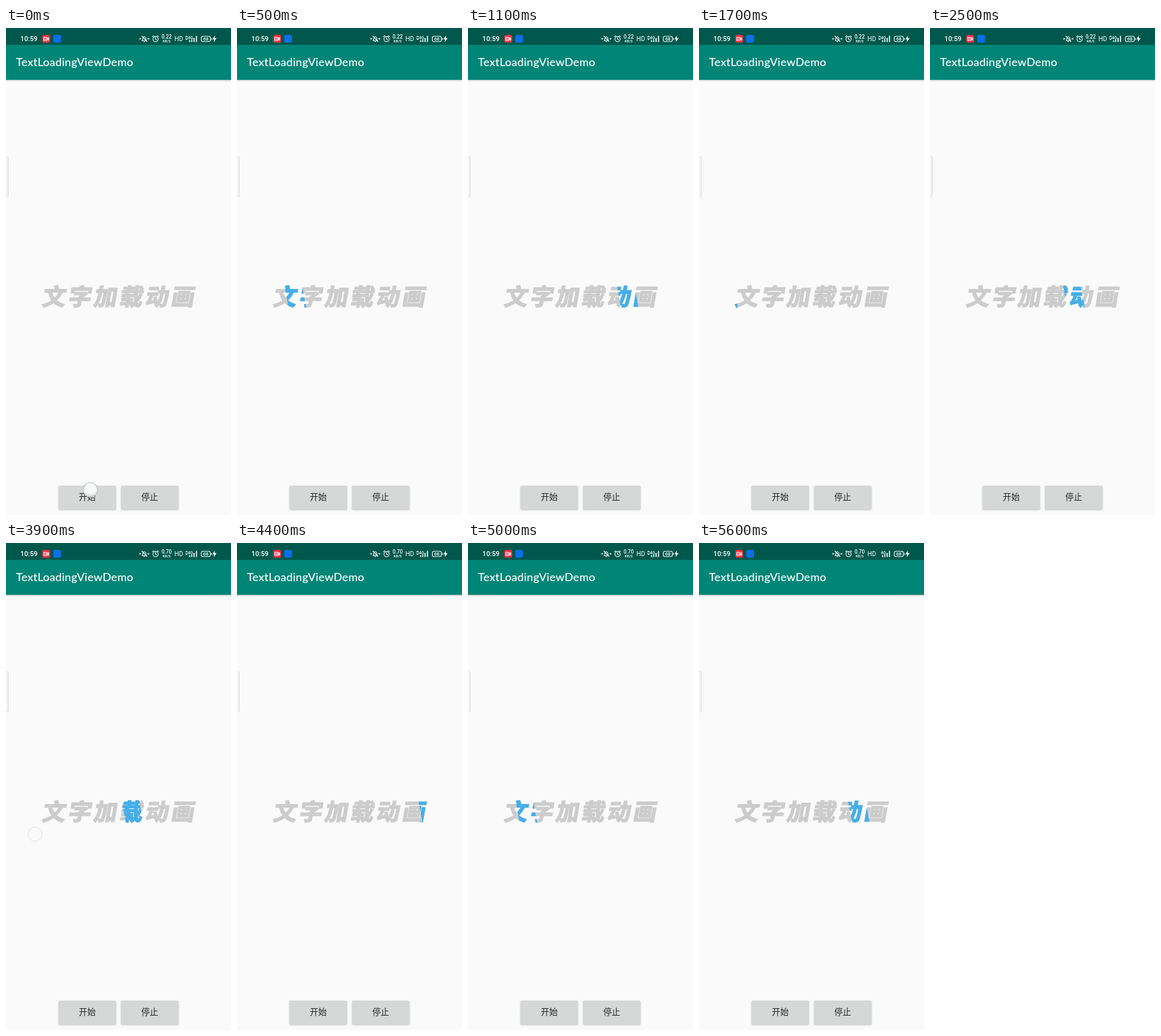
These frames come from a looping animation (360 by 780 pixels, 5700 ms). An HTML page:

```html
<!DOCTYPE html>
<html lang="zh-CN">
<head>
<meta charset="utf-8">
<title>TextLoadingViewDemo</title>
<style>
  html, body { margin: 0; width: 100%; height: 100%; overflow: hidden; background: #fafafa; }
  svg { display: block; width: 360px; height: 780px; }
  text { font-family: Lato, "Noto Sans CJK SC", "Noto Sans CJK", sans-serif; }
  .word { font: 900 37px "Noto Sans CJK SC", "Noto Sans CJK", sans-serif; letter-spacing: 4.2px; }
  .gray { fill: #ccc; stroke: #ccc; }
  .blue { fill: #46aeea; stroke: #46aeea; }
  .gray, .blue { stroke-width: 1.7px; stroke-linejoin: miter; stroke-miterlimit: 2; }
  .title { font-size: 18px; letter-spacing: .3px; fill: #fff; stroke: #fff; stroke-width: .2px; }
  .status { fill: #fff; font-family: Roboto, sans-serif; font-weight: 500; }
  .line { fill: none; stroke: #fff; stroke-width: 1.1; stroke-linecap: round; stroke-linejoin: round; }
  .label { font: 400 13.5px "Noto Sans CJK SC", "Noto Sans CJK", sans-serif; fill: #222; text-anchor: middle; }
  .button { fill: #d6d7d7; filter: drop-shadow(0 1px 1px rgba(0, 0, 0, .24)); }
</style>
</head>
<body>
<svg viewBox="0 0 360 780">
  <defs>
    <text id="word" class="word" transform="translate(57 444) skewX(-10)">文字加载动画</text>
    <clipPath id="clip"><polygon id="band"/></clipPath>
    <linearGradient id="shade" x2="0" y2="1">
      <stop stop-color="#000" stop-opacity=".2"/>
      <stop offset="1" stop-color="#000" stop-opacity="0"/>
    </linearGradient>
  </defs>

  <rect width="360" height="780" fill="#fafafa"/>
  <rect y="83" width="360" height="3" fill="url(#shade)"/>
  <rect y="27" width="360" height="56" fill="#008577"/>
  <rect width="360" height="27" fill="#00574b"/>
  <text class="title" x="16" y="61">TextLoadingViewDemo</text>

  <!-- status bar -->
  <text class="status" x="23" y="21" font-size="10.8">10:59</text>
  <rect x="58" y="11" width="12.5" height="12.5" rx="3" fill="#ee3044"/>
  <path class="line" d="M60.5 15h5v5h-5zM66 17l2.2-1.5v4L66 18M63 16.5v2"/>
  <rect x="75.5" y="11" width="12.5" height="12.5" rx="3" fill="#0b6fe8"/>
  <path class="line" d="M217.5 20.3h7.5M218.5 20l.5-4q2.3-4.5 4.6 0l.5 4M220.5 21.8h1.5M217.5 13l8 8.5M214 16.3v2M215.7 16.8v1M228.5 16.3v2M226.8 16.8v1"/>
  <circle class="line" cx="239.3" cy="17.8" r="4.2"/>
  <path class="line" d="M239.3 15.5v2.500l1.600 1M234.500 14l2-1.700M244.100 14l-2-1.700"/>
  <text class="status" id="speed" x="257" y="17" font-size="8.2" font-weight="700" text-anchor="middle">0.22</text>
  <text class="status" x="257" y="23" font-size="5.5" font-weight="700" text-anchor="middle">KB/S</text>
  <text class="status" x="269.5" y="21.3" font-size="10" style="font-weight:400">HD</text>
  <path class="line" id="arrows" d="M287.5 14.500l1.400-1.500 1.400 1.500M287.500 17l1.400 1.500 1.400-1.500"/>
  <text class="status" x="291" y="17.5" font-size="6.5">4G</text>
  <path stroke="#fff" stroke-width="1.7" d="M293.8 22.500v-3M297.300 22.500v-4M300.900 22.500v-6.500M304.700 22.500v-10"/>
  <rect class="line" x="312.5" y="13.2" width="14.5" height="8.6" rx="2.5"/>
  <path class="line" d="M328.5 16.5v2"/>
  <text class="status" x="319.8" y="20.2" font-size="7.5" text-anchor="middle">68</text>
  <path fill="#fff" d="M334.5 12l-4.500 6.200h3l-.8 4.500 4.800-6.400h-3.200z"/>

  <rect x="-2" y="206" width="5.5" height="64.5" rx="1.8" fill="#f4f4f4" stroke="#d9d9d9"/>

  <use href="#word" class="gray"/>
  <g clip-path="url(#clip)"><use href="#word" class="blue"/></g>

  <rect class="button" x="84" y="733" width="92" height="38" rx="2"/>
  <rect class="button" x="184" y="733" width="92" height="38" rx="2"/>
  <text class="label" x="130" y="756">开始</text>
  <text class="label" x="230" y="756">停止</text>

  <g id="press">
    <circle cx="135" cy="739.5" r="11.3" fill="#fafafa" fill-opacity=".8" stroke="#bcc6c4" stroke-width="1.3"/>
    <circle cx="135" cy="739.5" r="8.5" fill="#fff" fill-opacity=".5"/>
  </g>
  <circle id="tap" cx="46.5" cy="466.5" r="11.3" fill="#fafafa" fill-opacity=".6" stroke="#e2e2e2"/>
</svg>
<script>
  const LOOP = 5700, STEP = 100, SWEEP = 1500, DELAY = 63;
  const LEFT = 57, TRAVEL = 276, WIDTH = 28, LEAN = 7, TOP = 412, BOTTOM = 449;
  const $ = id => document.getElementById(id);
  const show = (id, on) => $(id).setAttribute('visibility', on ? 'visible' : 'hidden');

  function draw(t) {
    const phase = Math.max(0, t - DELAY) % SWEEP / SWEEP;
    const right = LEFT + TRAVEL * (1 - Math.cos(Math.PI * phase)) / 2;
    const left = right - WIDTH;
    $('band').setAttribute('points',
      `${left - LEAN},${TOP} ${right - LEAN},${TOP} ${right},${BOTTOM} ${left},${BOTTOM}`);
    $('speed').textContent = t < 3100 ? '0.22' : '0.70';
    show('arrows', t < 5500);
    show('press', t < 100);
    show('tap', t >= 3800 && t < 4000);
  }

  const start = performance.now();
  function tick() {
    const t = (performance.now() - start) % LOOP;
    draw(Math.floor(t / STEP) * STEP);
    requestAnimationFrame(tick);
  }
  tick();
</script>
</body>
</html>
```
